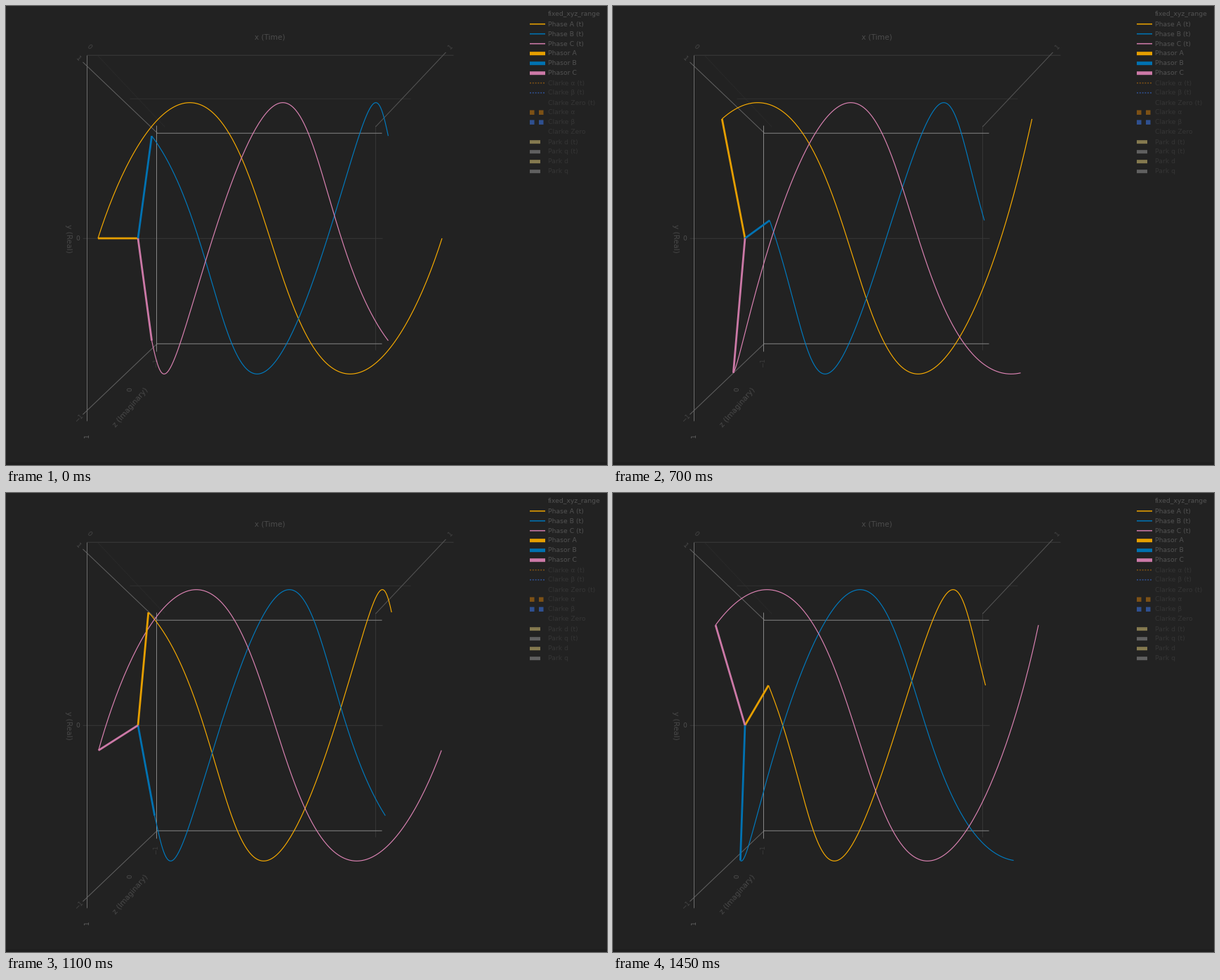
Recreate the animation shown at these times as a matplotlib script. Size 856 px wide and 654 px high, loop 1.55 s.

```python
import numpy as np
import matplotlib.pyplot as plt
from matplotlib.animation import FuncAnimation
from matplotlib.patches import Rectangle

W, H, DPI = 856, 654, 64
PX = 72 / DPI                # points per pixel
CX, CY = 375.5, 330.5        # vanishing point, in pixel centres
HALF = 188                   # half size of the unit cube at depth 0
DEPTH = 0.2327               # unit depth over camera distance
BG = "#222222"

ORANGE, BLUE, PINK = "#E69F00", "#0072B2", "#CC79A7"
PHASES = [
    (0, ORANGE, "#FCAE00"),
    (120, BLUE, "#007CC2"),
    (240, PINK, "#DF85B6"),
]

# Rotation in steps of 3.6 degrees, one entry per 50 ms
STEPS = [0] * 6 + [1, 3, 5, 6, 8, 8, 10, 12, 14, 16, 18, 19, 21, 21, 25,
                   28, 31, 31, 35, 37, 40, 42, 43, 44, 44]

plt.rcParams["font.family"] = "DejaVu Sans"
fig = plt.figure(figsize=(W / DPI, H / DPI), dpi=DPI, facecolor=BG)
ax = fig.add_axes([0, 0, 1, 1])
ax.set_xlim(-0.5, W - 0.5)
ax.set_ylim(H - 0.5, -0.5)
ax.axis("off")


def line(xs, ys, color, width=1.0, **kw):
    kw.setdefault("solid_capstyle", "butt")
    return ax.plot(xs, ys, color=color, lw=width * PX, snap=False, **kw)[0]


def label(x, y, text, size, color, rotation=0, **kw):
    kw = {"ha": "center", "va": "center", **kw}
    ax.text(x, y, text, fontsize=size * PX, color=color, rotation=rotation,
            **kw)


def block(x, mid, w, h, color):
    """Flat rectangle from pixel column x, centred on row mid."""
    ax.add_patch(Rectangle((x - 0.5, mid - h / 2), w, h, fc=color, lw=0,
                           snap=False))


def project(t, angle):
    """Screen position of a unit phasor at time t and angle (radians)."""
    scale = HALF / (1 - DEPTH * np.cos(angle))
    return CX + (2 * t - 1) * scale, CY - np.sin(angle) * scale


def draw_box():
    edges = [
        (130, 70, 226, 172, "#292929"),
        (176, 131.75, 576, 131.75, "#313131"),
        (115, 69.75, 637, 69.75, "#3A3A3A"),
        (109, 330.75, 536, 330.75, "#383838"),
        (526, 170, 526, 490, "#363636"),
        (526, 171.5, 626, 65.5, "#565656"),
        (109, 79.5, 215, 180.5, "#626262"),
        (109, 581.5, 215, 480.5, "#626262"),
        (115, 70, 115, 591, "#6C6C6C"),
        (214, 170, 214, 492, "#858585"),
        (214, 180.75, 535, 180.75, "#858585"),
        (214, 480.75, 535, 480.75, "#858585"),
    ]
    for x0, y0, x1, y1, color in edges:
        line([x0, x1], [y0, y1], color, zorder=1)

    label(375.7, 43.8, "x (Time)", 10.5, "#4C4C4C")
    label(88.4, 330.5, "y (Real)", 10.5, "#484848", 270)
    label(176.7, 571.7, "z (Imaginary)", 10.5, "#484848", 49)

    ticks = [
        (118, 57.5, "0", -45, "#444444"),
        (102, 74.5, "1", -45, "#4A4A4A"),
        (633, 57.5, "1", 45, "#444444"),
        (102, 330.5, "0", 0, "#505050"),
        (104, 586.5, "\u22121", 45, "#444444"),
        (114.7, 611.3, "1", 90, "#606060"),
        (176.7, 545.5, "0", 90, "#505050"),
        (213, 507.5, "\u22121", 90, "#3C3C3C"),
    ]
    for x, y, text, rotation, color in ticks:
        label(x, y, text, 9.2, color, rotation)


def draw_legend():
    brown, navy, khaki, grey = "#7D5115", "#2F5090", "#857A4F", "#606060"
    rows = [
        ("fixed_xyz_range", None, None),
        ("Phase A (t)", "thin", ORANGE),
        ("Phase B (t)", "thin", BLUE),
        ("Phase C (t)", "thin", PINK),
        ("Phasor A", "thick", ORANGE),
        ("Phasor B", "thick", BLUE),
        ("Phasor C", "thick", PINK),
        ("Clarke α (t)", "dots", brown),
        ("Clarke β (t)", "dots", navy),
        ("Clarke Zero (t)", None, None),
        ("Clarke α", "squares", brown),
        ("Clarke β", "squares", navy),
        ("Clarke Zero", None, None),
        ("Park d (t)", "short", khaki),
        ("Park q (t)", "short", grey),
        ("Park d", "short", khaki),
        ("Park q", "short", grey),
    ]
    for i, (text, kind, color) in enumerate(rows):
        y = 11.2 + 14 * i
        label(771.5, y + 2.8, text, 9.25, "#525252" if i < 7 else "#353535",
              ha="left", va="baseline")
        if kind == "thin":
            block(746, y, 22, 1.6, color)
        elif kind == "thick":
            block(746, y, 22, 5, color)
        elif kind == "short":
            block(746, y, 15, 5, color)
        elif kind == "dots":
            for k in range(6):
                block(746 + 3.8 * k, y, 2, 1.6, color)
        elif kind == "squares":
            block(746, y, 6.5, 6.5, color)
            block(759, y, 6.5, 6.5, color)


block(0, 651.5, W, 4, "#1E1E1E")
draw_box()
draw_legend()

time = np.linspace(0, 1, 201)
waves = [line([], [], thin, 1.15, zorder=3, solid_joinstyle="round")
         for _, _, thin in PHASES]
phasors = [line([], [], color, 2.8, zorder=4) for _, color, _ in PHASES]


def update(i):
    turn = np.radians(3.6 * STEPS[i])
    for (shift, _, _), wave, phasor in zip(PHASES, waves, phasors):
        start = turn + np.radians(shift)
        wave.set_data(*project(time, start + 2 * np.pi * time))
        x, y = project(0, start)
        phasor.set_data([CX - HALF, x], [CY, y])
    return waves + phasors


anim = FuncAnimation(fig, update, frames=len(STEPS), interval=50,
                     repeat=True, repeat_delay=0, blit=False)
plt.show()
```
